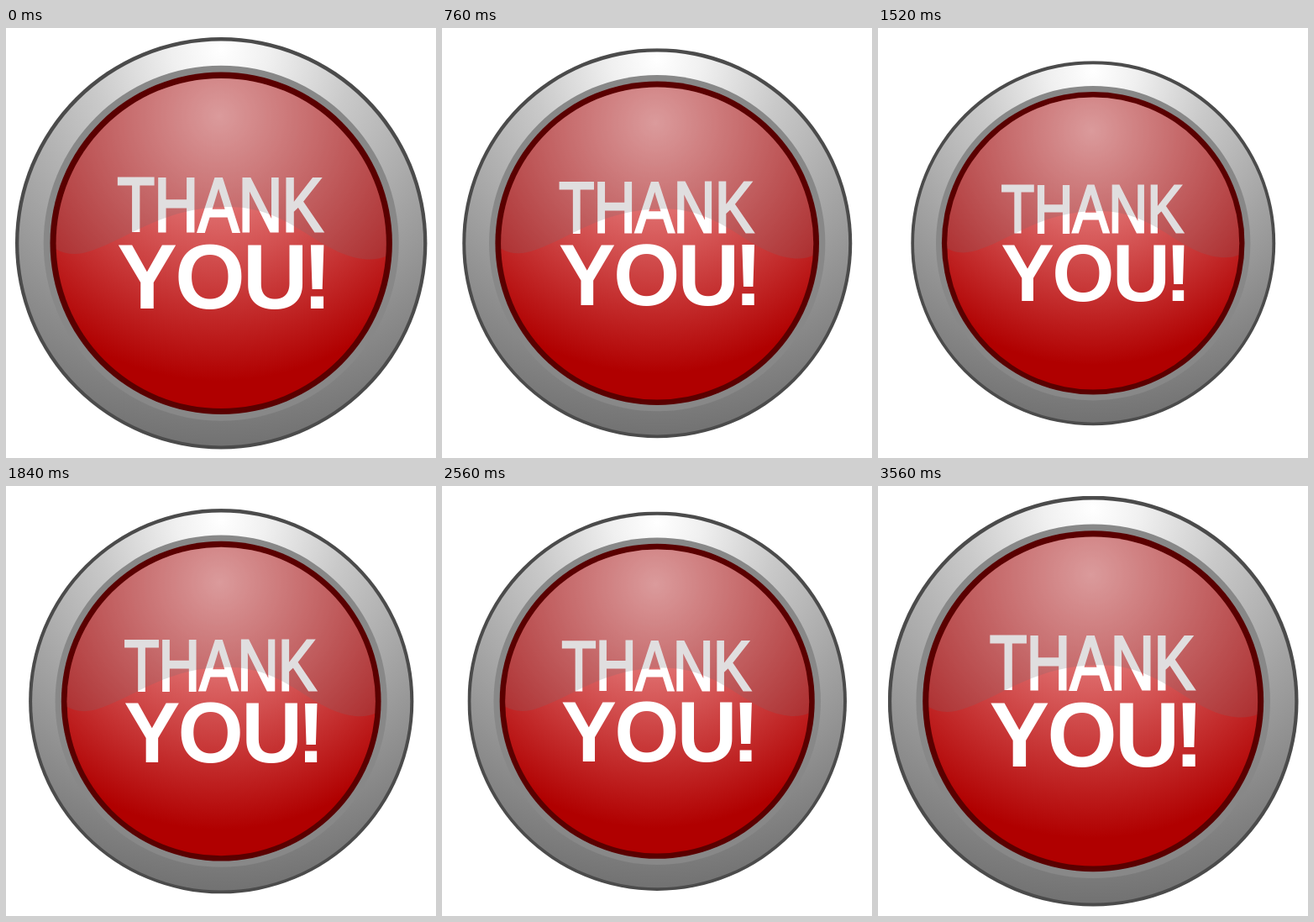
Write an HTML page without scripts that moves like this. It is 512 by 512 pixels and loops after 3600 ms.

```html
<!DOCTYPE html>
<html lang="en">
<head>
<meta charset="utf-8">
<title>Thank you button</title>
<style>
  html, body { margin: 0; width: 100%; height: 100%; overflow: hidden; background: #fff; }
  svg { display: block; width: 100vw; height: 100vh; }
  text { font-family: "Liberation Sans", Arial, sans-serif; fill: #fff; }
  .thank { font-size: 91px; letter-spacing: -.6px; stroke: #fff; stroke-width: 3.2px; }
  .you { font-size: 110px; font-weight: 700; letter-spacing: -3px; }

  .button { transform-origin: 256.2px 256.2px; animation: pulse 3600ms infinite; }

  /* Three pulses, each slower than the last, moving in 40 ms ticks. */
  @keyframes pulse {
    0%       { transform: scale(1);     animation-timing-function: steps(12); }
    13.3333% { transform: scale(.874);  animation-timing-function: steps(12); }
    26.6667% { transform: scale(.998);  animation-timing-function: steps(15); }
    43.3333% { transform: scale(.877);  animation-timing-function: steps(15); }
    60%      { transform: scale(1);     animation-timing-function: steps(16); }
    77.7778% { transform: scale(.873);  animation-timing-function: steps(20); }
    100%     { transform: scale(1.003); }
  }
</style>
</head>
<body>
<svg viewBox="0 0 512 512" role="img" aria-label="Thank you!">
  <defs>
    <radialGradient id="metal" gradientUnits="userSpaceOnUse" cx="256" cy="25" r="480">
      <stop offset="0" stop-color="#fff"/>
      <stop offset=".12" stop-color="#f0f0f0"/>
      <stop offset=".33" stop-color="#c9c9c9"/>
      <stop offset=".6" stop-color="#a3a3a3"/>
      <stop offset=".88" stop-color="#7f7f7f"/>
      <stop offset="1" stop-color="#707070"/>
    </radialGradient>
    <radialGradient id="red" gradientUnits="userSpaceOnUse" cx="254" cy="105" r="315">
      <stop offset="0" stop-color="#f8a8a8"/>
      <stop offset="1" stop-color="#b00000"/>
    </radialGradient>
    <clipPath id="face"><circle cx="256.2" cy="256.5" r="196.6"/></clipPath>
  </defs>

  <g class="button">
    <circle cx="256.2" cy="256.2" r="245.2" fill="#4b4b4b"/>
    <circle cx="256.2" cy="256.5" r="240.9" fill="url(#metal)"/>
    <circle cx="256.2" cy="256.2" r="211.5" fill="#888"/>
    <circle cx="256.2" cy="256.2" r="203.7" fill="#5a0000"/>
    <circle cx="256.2" cy="256.5" r="196.6" fill="url(#red)"/>

    <text class="thank" transform="translate(132.6 241.8) scale(.8 1)">THANK</text>
    <text class="you" transform="translate(132 334.3) scale(.98 1)">YOU<tspan dx="-4">!</tspan></text>

    <path clip-path="url(#face)" fill="#756d70" fill-opacity=".225"
      d="M50 256 Q72 277 105 264 C150 248 190 213 264 213 C340 213 370 268 425 275 Q447 278 462 266 V40 H50Z"/>
  </g>
</svg>
</body>
</html>
```
